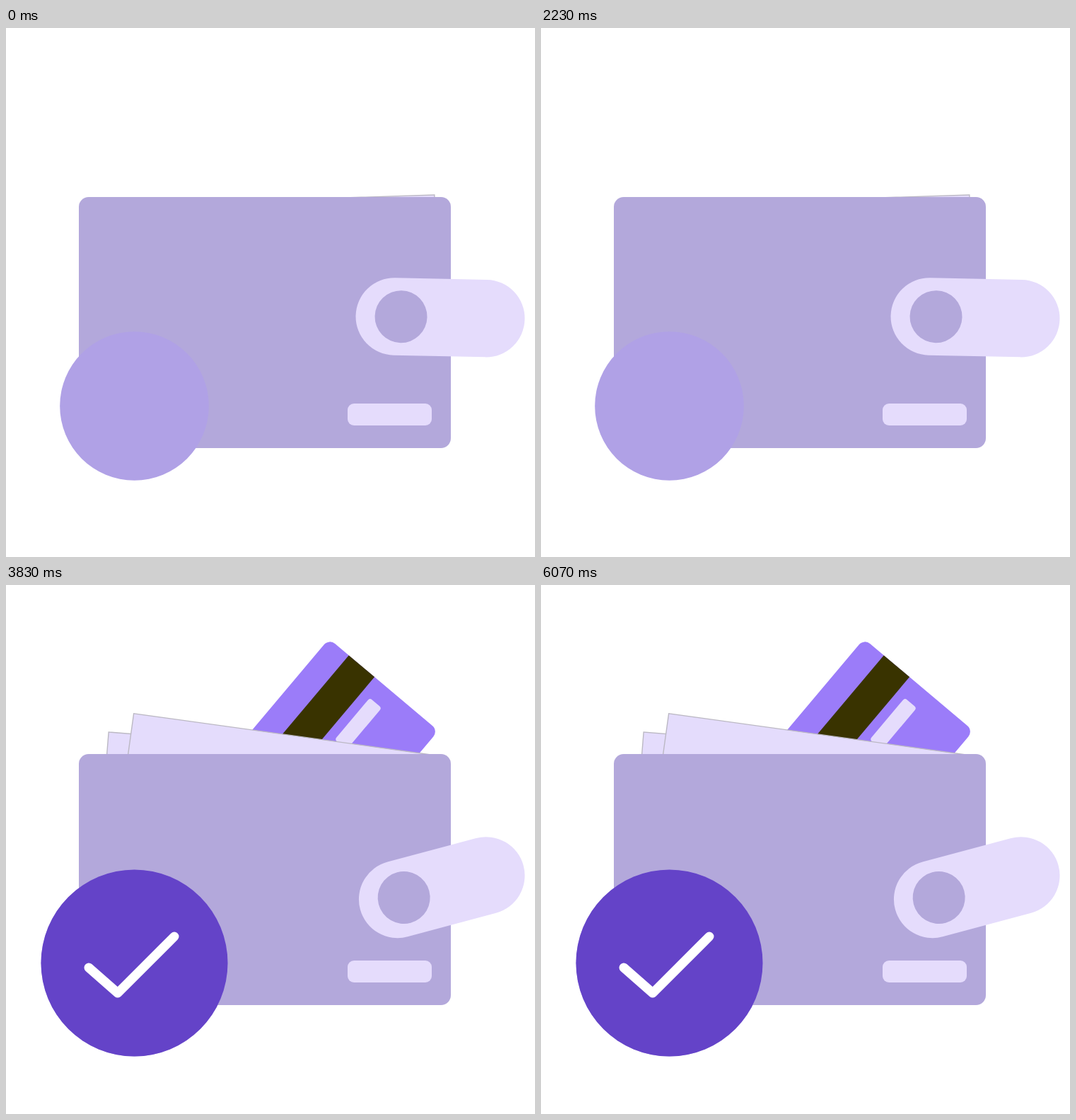
Write an HTML page that moves like this. It is 748 by 748 pixels and loops after 6710 ms.

```html
<!DOCTYPE html>
<html lang="en">
<head>
<meta charset="utf-8">
<title>Wallet</title>
<style>
  html, body { margin: 0; width: 100%; height: 100%; overflow: hidden; background: #fff; }
  svg { display: block; width: 100%; height: 100%; }
  .pale { fill: #e5dcfc; }
  .lilac { fill: #b3a8db; }
  .bill { fill: #e4dcfc; stroke: #bbb8c3; stroke-width: 1.4; }
</style>
</head>
<body>
<svg viewBox="0 0 748 748">
  <g id="card">
    <rect x="-30" y="-23" width="352" height="202" rx="11" fill="#9b7cf9"/>
    <rect x="-30" y="13.5" width="352" height="47.5" fill="#393300"/>
    <rect class="pale" x="218" y="75" width="77" height="22" rx="4"/>
  </g>
  <rect id="backBill" class="bill" x="-436" y="-53" width="468" height="200"/>
  <rect id="frontBill" class="bill" x="-406" y="-53" width="438" height="200"/>
  <rect class="lilac" x="103" y="239" width="526" height="355" rx="14"/>
  <rect class="pale" x="483" y="531" width="119" height="31" rx="9"/>
  <g id="strap">
    <rect class="pale" x="-185" y="-54.7" width="239" height="109.4" rx="54.7"/>
    <circle class="lilac" cx="-121" r="37"/>
  </g>
  <g id="badge">
    <circle r="132" fill="#b0a1e6"/>
    <circle id="badgeDark" r="132" fill="#6443c8"/>
    <path id="check" d="M-64.5 6.5L-23.5 42.5L56.5 -37.5" fill="none" stroke="#fff"
          stroke-width="13" stroke-linecap="round" stroke-linejoin="round"/>
  </g>
</svg>
<script>
const LOOP = 6710, CYCLE = LOOP / 3, LEAD = 7;
const part = id => document.getElementById(id);

// Linear interpolation through [time, value] keys, held at both ends.
function track(time, keys) {
  if (time <= keys[0][0]) return keys[0][1];
  for (let i = 1; i < keys.length; i++) {
    const [t0, v0] = keys[i - 1], [t1, v1] = keys[i];
    if (time < t1) return v0 + (v1 - v0) * (time - t0) / (t1 - t0);
  }
  return keys[keys.length - 1][1];
}

function pivot(id, x, y, angle) {
  part(id).setAttribute('transform', `translate(${x} ${y}) rotate(${angle})`);
}

function draw(now) {
  const time = (now % LOOP + LEAD) % CYCLE;
  pivot('strap', 679.5, 410.7, track(time, [[20, 1.2], [330, -17], [450, -15]]));
  pivot('backBill', 575.5, 295.8, track(time, [[200, 0], [530, 6.5], [650, 4.6]]));
  pivot('frontBill', 575.5, 290, track(time, [[250, -1.8], [610, 11], [733, 7.9]]));
  pivot('card', 267, 337, -track(time, [[395, 0], [677, 33.9], [707, 37.6], [870, 57.8], [1070, 49.9]]));

  const scale = track(time, [[20, 0.798], [300, 1.064], [450, 1]]);
  part('badge').setAttribute('transform', `translate(181.5 534.5) scale(${scale})`);
  const fade = track(time, [[677, 0], [1257, 1]]);
  part('badgeDark').setAttribute('opacity', fade);
  part('check').setAttribute('opacity', fade);
}

const start = performance.now();
function tick() {
  draw(performance.now() - start);
  requestAnimationFrame(tick);
}
draw(0);
requestAnimationFrame(tick);
</script>
</body>
</html>
```
